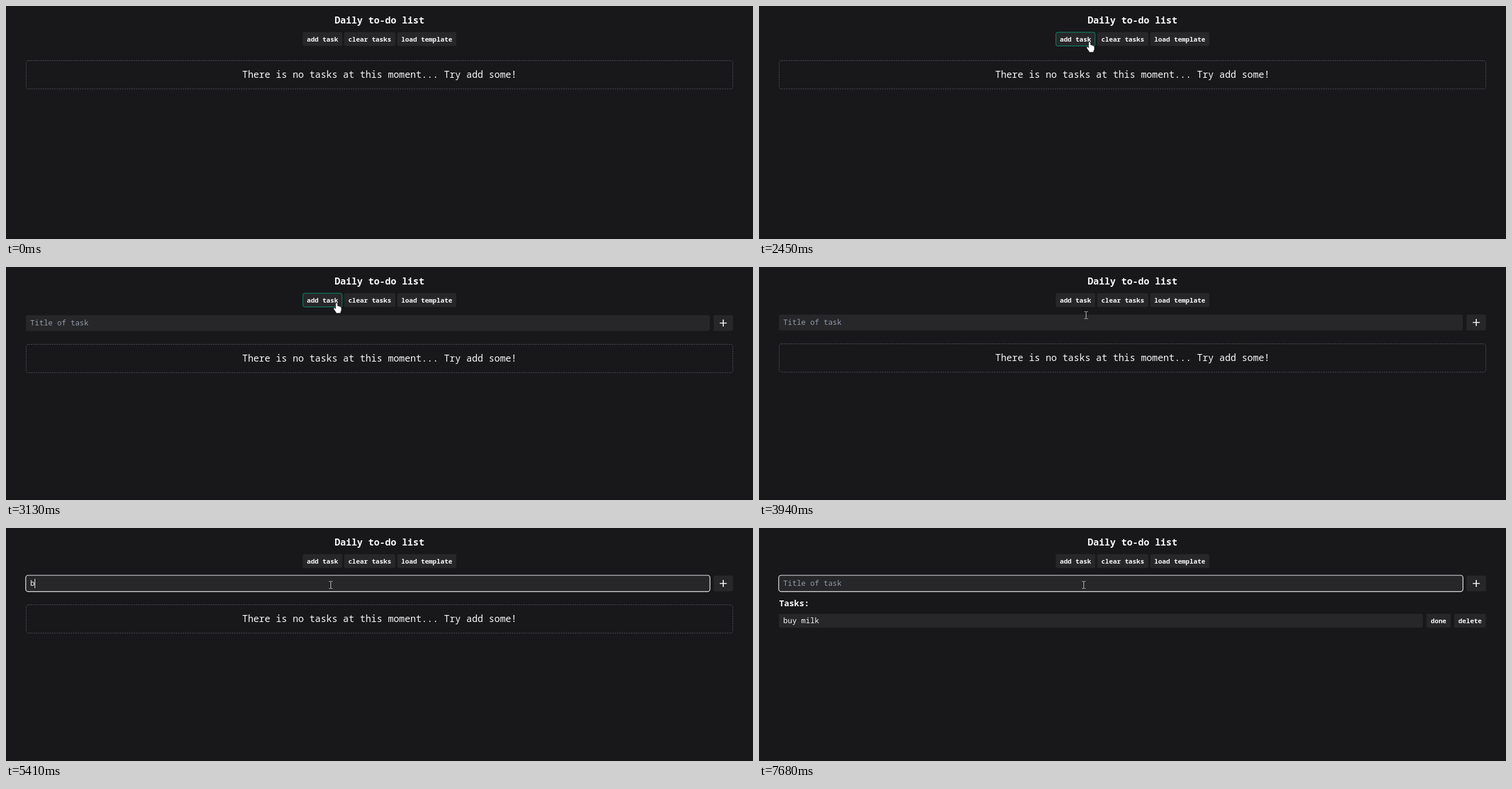
Recreate the animation shown at these times as an HTML page. Size 1280 by 399 pixels, loop 8 s.

```html
<!DOCTYPE html>
<html lang="en">
<head>
<meta charset="utf-8">
<title>Daily to-do list</title>
<style>
  html, body { margin: 0; width: 100%; height: 100%; overflow: hidden; background: #18181b; }
  svg { display: block; width: 1280px; height: 399px; }
  text { font-family: "Noto Sans Mono", "DejaVu Sans Mono", monospace; fill: #fafafa; white-space: pre; }
  .title { font-size: 16px; font-weight: 700; text-anchor: middle; }
  .label { font-size: 11.2px; font-weight: 600; text-anchor: middle; }
  .note { font-size: 16px; font-weight: 500; text-anchor: middle; }
  .field { font-size: 12.8px; }
  .heading { font-size: 14.4px; font-weight: 700; }
  .hint { fill: #949ca9; }
  .panel { fill: #27272a; }
</style>
</head>
<body>
<svg viewBox="0 0 1280 399">
  <rect width="1280" height="399" fill="#18181b"/>
  <rect y="398" width="1280" height="1" fill="#121214"/>
  <text class="title" x="640" y="29.5">Daily to-do list</text>
  <g id="toolbar"></g>
  <rect id="hover" x="508.8" y="45" width="67" height="23.4" rx="3" fill="none" stroke="#059669"/>

  <g id="empty">
    <rect x="34.5" y="131.5" width="1211" height="48.5" rx="4" fill="none"
          stroke="#52525b" stroke-dasharray="2.4 1.6"/>
    <text class="note" x="640" y="161.4">There is no tasks at this moment... Try add some!</text>
  </g>

  <g id="form">
    <rect class="panel" x="34" y="81.5" width="1172" height="27" rx="3"/>
    <rect id="focus" x="33.8" y="81" width="1172.5" height="27.8" rx="4" fill="none" stroke="#fafafa" stroke-width="1.2"/>
    <text id="hint" class="field hint" x="41.6" y="99.3">Title of task</text>
    <text id="typed" class="field" x="41.6" y="99.3"></text>
    <rect id="caret" y="87" width="1" height="16" fill="#fafafa"/>
    <rect class="panel" x="1212.4" y="81.5" width="33.4" height="27" rx="3"/>
    <path d="M1223 95H1235M1229 89V101" stroke="#fafafa" stroke-width="1.7"/>
  </g>

  <g id="tasks">
    <text class="heading" x="34.4" y="134">Tasks:</text>
    <rect class="panel" x="34" y="147" width="1103.5" height="23.8" rx="3"/>
    <text class="field" x="41.6" y="163.2">buy milk</text>
  </g>

  <g id="arrow" stroke="#000" stroke-width=".7" fill="#fff">
    <path d="M.4 .4V13L3.3 10.3L5.2 14.8L7.2 14L5.3 9.6H9.2Z"/>
  </g>
  <g id="hand" stroke="#18181b" stroke-width=".6" fill="#fff">
    <path d="M-1.6 1.3Q-1.4 -.3 0 -.3Q1.5 -.3 1.6 1.3V5.2Q3.4 4.6 4 6Q5.5 5.4 6.1 6.8Q8 6.3 8.2 8.4V12
             Q8 14.2 6.8 15.6V17.6H-1V16Q-2.8 14 -4.9 10.6Q-5.6 8.8 -4.3 8.4Q-2.9 8.2 -1.6 10Z"/>
  </g>
  <g id="beam" stroke="#c9c9cb" fill="none">
    <path d="M-3 -6H-1L0 -5.4L1 -6H3M0 -5.4V5.4M-3 6H-1L0 5.4L1 6H3"/>
  </g>
</svg>
<script>
const LOOP = 8000, STEP = 70;
const $ = id => document.getElementById(id);

// Spans of time in which the picture moves; it holds still between them.
const BURSTS = [[240, 310], [570], [1900, 2450], [2850, 3400], [3730, 4410], [4550], [4950],
  [5410], [5540], [5680], [6140], [6340], [6470], [6670], [7000], [7200, 7680]];
const KEYS = [5410, 5540, 5680, 6140, 6340, 6470, 6670, 7000];
const TASK = "buy milk", CHAR = 7.68, FOCUS = 4290, SUBMIT = 7200;

const POINTER = [[240, 829, 344], [310, 717, 303], [570, 713, 308], [1830, 713, 308],
  [1970, 688, 266], [2110, 624, 158], [2250, 577, 79], [2320, 566.5, 61.5], [3660, 566.5, 61.5],
  [3800, 565, 70], [3940, 560.5, 82.5], [4080, 552, 91], [4150, 548.5, 93.5], [4410, 548.5, 93.5], [4550, 556.5, 97.5]];
const OPEN = [[2780, 0], [2850, .06], [2920, .3], [2990, .65], [3060, .92], [3130, 1.026], [3270, 1.02], [3400, 1]];
const HOVER = [[2250, 0], [2390, 1], [3730, 1], [3870, 0]];
const NOTE = [[7130, 1], [7340, 0]];
const LIST = [[7270, 0], [7610, 1]];

function track(keys, t, col = 1) {
  if (t <= keys[0][0]) return keys[0][col];
  const i = keys.findIndex(k => k[0] > t);
  if (i < 0) return keys[keys.length - 1][col];
  const a = keys[i - 1], b = keys[i];
  return a[col] + (b[col] - a[col]) * (t - a[0]) / (b[0] - a[0]);
}

function snap(t) {
  let held = 0;
  for (const [start, end = start] of BURSTS) {
    if (t < start) break;
    held = t >= end ? end : start + Math.floor((t - start) / STEP) * STEP;
  }
  return held;
}

const button = (x, y, w, label) =>
  `<rect class="panel" x="${x}" y="${y}" width="${w}" height="23.8" rx="3"/>` +
  `<text class="label" x="${x + w / 2}" y="${y + 15.8}">${label}</text>`;

$("toolbar").innerHTML = button(508.4, 44.8, 67.8, "add task") +
  button(579.4, 44.8, 87.8, "clear tasks") + button(670.4, 44.8, 101.2, "load template");
$("tasks").innerHTML += button(1143.5, 147, 41.8, "done") + button(1191.2, 147, 54.4, "delete");

const fade = (id, v) => $(id).setAttribute("opacity", Math.max(0, Math.min(1, v)));
const move = (id, x, y) => $(id).setAttribute("transform", `translate(${x} ${y})`);

function render(time) {
  const t = snap(time);

  const open = track(OPEN, t), shift = 38 * (open - 1);
  move("form", 0, shift);
  move("empty", 0, shift);
  fade("form", open);
  fade("hover", track(HOVER, t));
  fade("empty", track(NOTE, t));
  fade("tasks", track(LIST, t));

  const count = t < SUBMIT ? KEYS.filter(k => k <= t).length : 0;
  $("typed").textContent = TASK.slice(0, count);
  fade("hint", count ? 0 : 1);
  fade("focus", t >= FOCUS ? 1 : 0);
  $("caret").setAttribute("x", 41 + Math.floor(CHAR * count + .6));
  fade("caret", (t >= FOCUS && t < 4950) || (t >= KEYS[0] && t < 7620) ? 1 : 0);

  const x = track(POINTER, t), y = track(POINTER, t, 2);
  const kind = t < 240 ? "" : y < 69 ? "hand" : t > 3400 && y >= 81.5 ? "beam" : "arrow";
  for (const id of ["arrow", "hand", "beam"]) {
    move(id, x, y);
    fade(id, id === kind ? 1 : 0);
  }
}

const began = performance.now();
function tick() {
  render((performance.now() - began) % LOOP);
  requestAnimationFrame(tick);
}
tick();
</script>
</body>
</html>
```
